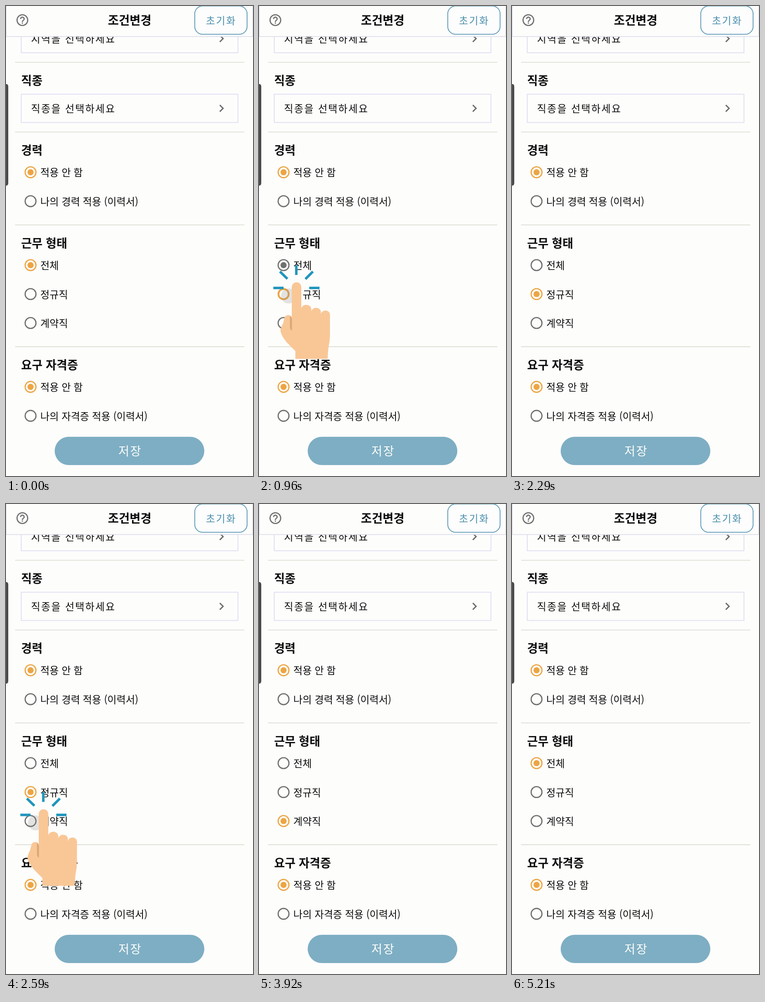
These frames come from a looping animation (543 px wide and 1031 px high, 5.25 s). An HTML page:

```html
<!DOCTYPE html>
<html lang="ko">
<head>
<meta charset="utf-8">
<title>조건변경</title>
<style>
  html, body { margin: 0; width: 100%; height: 100%; overflow: hidden; background: #fdfdfc; }
  svg { display: block; position: absolute; left: 0; top: 0; }
  text { font-family: "Noto Sans CJK KR", "Noto Sans CJK", "Noto Sans KR", sans-serif; font-size: 22px; fill: #0c0c0c; white-space: pre; }
  .head { font-size: 25.6px; font-weight: 700; }
  .wide { letter-spacing: 2px; }
  .divider { stroke: #d9dccf; stroke-width: 1.6; }
  .box { fill: none; stroke: #d9d9f0; stroke-width: 1.5; }
  .chevron { fill: none; stroke: #6d6d6d; stroke-width: 2.8; }
  .ring { fill: none; }
</style>
</head>
<body>
<svg width="543" height="1031" viewBox="0 0 543 1031">
  <rect width="543" height="1031" fill="#fdfdfc"/>
  <g id="form"></g>

  <g id="header">
    <rect width="543" height="67" fill="#fdfdfc"/>
    <path d="M0.5 0V67H542.5V0" fill="none" stroke="#dcdcea" stroke-width="1.6"/>
    <path transform="translate(20.4 15.4) scale(1.3)" fill="#6f6f6f" d="M11 18h2v-2h-2v2zm1-16C6.48 2 2 6.48 2 12s4.48 10 10 10 10-4.48 10-10S17.52 2 12 2zm0 18c-4.41 0-8-3.59-8-8s3.59-8 8-8 8 3.59 8 8-3.59 8-8 8zm0-14c-2.21 0-4 1.79-4 4h2c0-1.1.9-2 2-2s2 .9 2 2c0 2-3 1.75-3 5h2c0-2.25 3-2.5 3-5 0-2.21-1.79-4-4-4z"/>
    <text class="head" x="224" y="40.8" style="font-size:26px">조건변경</text>
    <rect x="415" y="0" width="115" height="62" rx="17" fill="#fdfdfd" stroke="#4b8fad" stroke-width="1.6"/>
    <text class="wide" x="439.5" y="39.5" style="fill:#4b8fad">초기화</text>
  </g>

  <path d="M0 171Q5 171 5 177V388Q5 394 0 394Z" fill="#4a4a4a"/>
  <rect x="107" y="945" width="329" height="62" rx="31" fill="#7eaec3"/>
  <text class="wide" x="247" y="985.6" style="font-size:26px;fill:#fdfdfb">저장</text>

  <g id="touch"><circle cx="65" cy="636" r="16.5" fill="#808080" opacity=".22"/></g>
  <g id="hand">
    <path d="M72 683V616.5a10.5 10.5 0 0 1 21 0V664a11 9.5 0 0 1 22 2V670a10.5 9 0 0 1 21 2V676a10 9 0 0 1 20 2V722Q156 733 153.500 745Q151.500 756 151 774H80V757L61 738Q48 722 47 712Q48 705 53 696L56 684Q58 678 64 678Q70 678 72 683Z" fill="#f9c796"/>
    <path d="M68 680Q72.500 682 72.500 688V712Q68 711 68 703Z" fill="#dba878"/>
    <path d="M82 568.500V590M46 582.500L62.500 598.500M118.500 582.500L102 599M31.500 618.500H54M110.500 618.500H133" fill="none" stroke="#1f95bd" stroke-width="5.4"/>
  </g>
</svg>
<script>
const LOOP = 5250;
const ORANGE = '#eca544', GRAY = '#707070';
const ROW = 63.5;
const HAND_LEAD = 120, HAND_TIME = 370;

// time of each selection and the row of the job-type group it picks
const taps = [
  { at: 920, row: 1 },
  { at: 2600, row: 2 },
  { at: 4080, row: 0 }
];

const form = document.getElementById('form');
const hand = document.getElementById('hand');
const touch = document.getElementById('touch');

function add(tag, attrs, text) {
  const el = document.createElementNS('http://www.w3.org/2000/svg', tag);
  for (const key in attrs) el.setAttribute(key, attrs[key]);
  if (text) el.textContent = text;
  form.appendChild(el);
  return el;
}

function field(y, label) {
  add('rect', { class: 'box', x: 33.5, y: y - 31, width: 476.5, height: 62 });
  add('text', { class: 'wide', x: 55, y: y + 8.5 }, label);
  add('path', { class: 'chevron', d: `M470 ${y - 7.2}l7.2 7.2l-7.2 7.2` });
}

function section(y, title) {
  add('line', { class: 'divider', x1: 20, x2: 524, y1: y, y2: y });
  add('text', { class: 'head', x: 33.3, y: y + 49.3 }, title);
}

function radio(y, label) {
  const ring = add('circle', { class: 'ring', cx: 54, cy: y });
  const dot = add('circle', { cx: 54, cy: y });
  add('text', { x: 75.5, y: y + 8.7 }, label);
  return { ring, dot };
}

function paint(item, color, width, dotSize) {
  item.ring.setAttribute('stroke', color);
  item.ring.setAttribute('stroke-width', width);
  item.ring.setAttribute('r', 13.2 - width / 2);
  item.dot.setAttribute('fill', color);
  item.dot.setAttribute('r', 6.7 * dotSize);
}

field(71.5, '지역을 선택하세요');
section(123.5, '직종');
field(224.500, '직종을 선택하세요');
section(276.5, '경력');
const fixed = [radio(364.7, '적용 안 함'), radio(428.2, '나의 경력 적용 (이력서)')];
section(480.3, '근무 형태');
const types = ['전체', '정규직', '계약직'].map((name, i) => radio(568.4 + i * ROW, name));
section(747.4, '요구 자격증');
fixed.push(radio(835.5, '적용 안 함'), radio(899, '나의 자격증 적용 (이력서)'));
fixed.forEach((item, i) => paint(item, i % 2 ? GRAY : ORANGE, 2.6, i % 2 ? 0 : 1));

const ramp = (t, a, b) => Math.min(1, Math.max(0, (t - a) / (b - a)));
const bump = (t, a, b) => Math.sin(Math.PI * ramp(t, a, b));

function render(t) {
  let current = 0, previous = -1, since = LOOP;
  let handRow = null, touchRow = null;
  for (const { at, row } of taps) {
    const p = t - at;
    if (p >= 0) {
      previous = current;
      current = row;
      since = p;
    }
    if (p >= -HAND_LEAD && p < HAND_TIME - HAND_LEAD) handRow = row;
    if (p >= -80 && p < 80) touchRow = row;
  }
  types.forEach((item, i) => {
    if (i === current) {
      paint(item, ORANGE, 2.6 + 1.8 * bump(since, 0, 150), ramp(since, 120, 250));
    } else if (i === previous) {
      paint(item, GRAY, 2.6 + 1.6 * bump(since, 150, 350), 1 - ramp(since, 50, 170));
    } else {
      paint(item, GRAY, 2.6, 0);
    }
  });
  place(hand, handRow);
  place(touch, touchRow);
}

function place(el, row) {
  el.style.display = row === null ? 'none' : '';
  if (row !== null) el.setAttribute('transform', `translate(0 ${(row - 1) * ROW})`);
}

const start = performance.now();
function tick() {
  render((performance.now() - start) % LOOP);
  requestAnimationFrame(tick);
}
tick();
</script>
</body>
</html>
```
